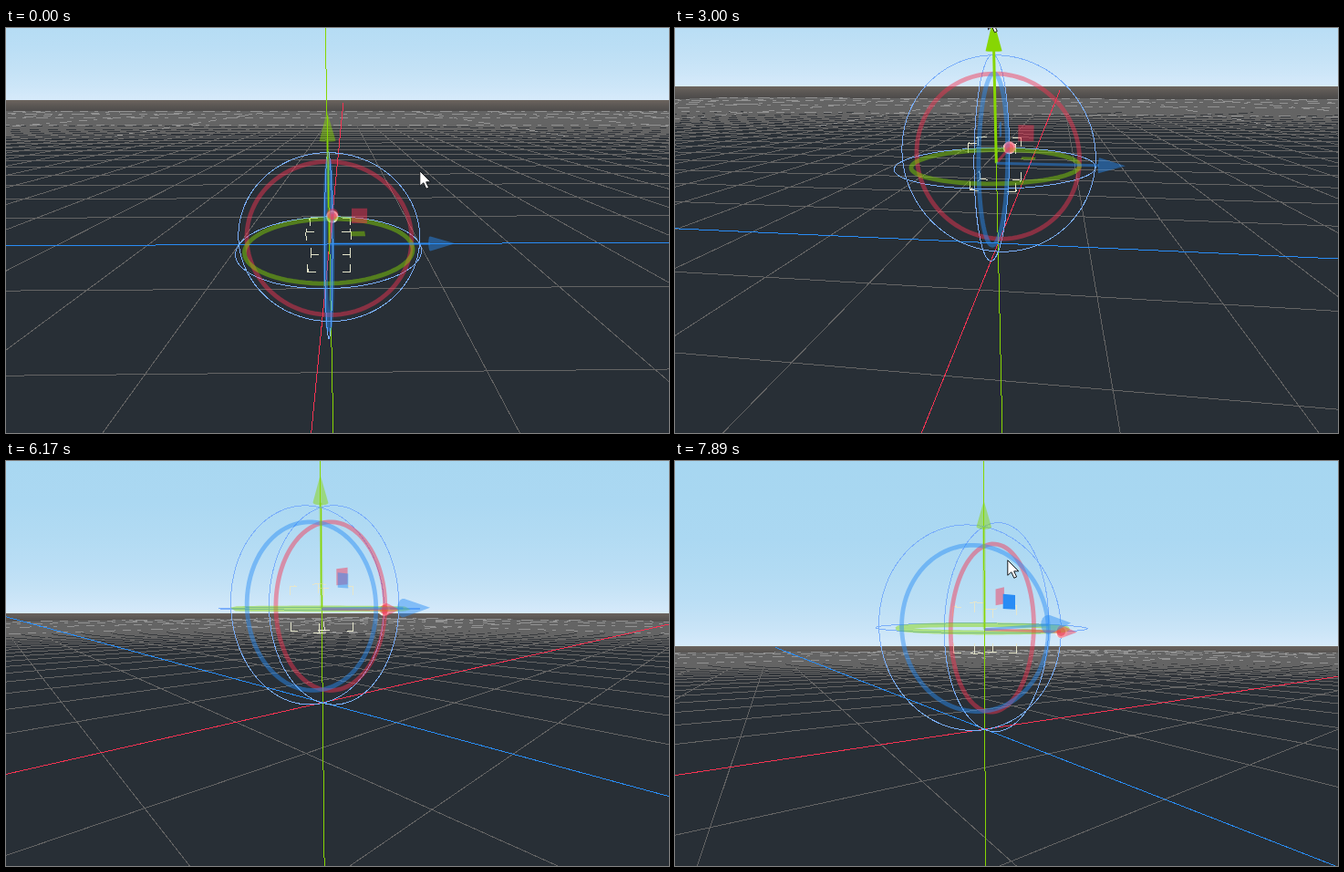
Animation of 727 by 444 pixels, one loop 8000 ms. Source, as an HTML page:

```html
<!DOCTYPE html>
<html>
<head>
<meta charset="utf-8">
<title>3D viewport</title>
<style>
html, body { margin: 0; width: 100%; height: 100%; overflow: hidden; background: #282f36; }
svg { display: block; width: 727px; height: 444px; }
</style>
</head>
<body>
<svg id="view" viewBox="0 0 727 444" xmlns="http://www.w3.org/2000/svg"></svg>
<script>
const LOOP = 8000, TICK = 1000 / 18;
const F = 395, CX = 376, CY = 222, RAD = Math.PI / 180;
const COLORS = ['#f53352', '#87d603', '#298cf5'];
const AXES = [[1, 0, 0], [0, 1, 0], [0, 0, 1]];
const DIM = 0.47;

// Orbit poses: yaw, horizon y, world centre on screen (x, y) and its depth
const POSES = [
  [-0.8, 79, 354.8, 237, 3.99],
  [6.4, 64, 354.3, 236, 4.03],
  [31.6, 143, 354.3, 234, 4.08],
  [58.2, 188, 340.8, 293, 3.68],
  [55.6, 202.5, 339.8, 294, 3.61]
];
// When the camera travels from each pose to the next
const MOVES = [[390, 1220], [4945, 5440], [5440, 6830], [7000, 7885]];

// Where the pointer is seen and what it lights up
const HOVERS = [
  { from: 0, to: 170, at: [453, 156] },
  { from: 1280, to: 4780, grab: 1.33, arrow: 1 },
  { from: 5440, to: 5560, at: [448, 201] },
  { from: 6830, to: 7060, at: [400, 205], arrow: 2 },
  { from: 7885, to: LOOP, at: [364, 108], plane: 2 }
];

const clamp01 = v => Math.min(1, Math.max(0, v));

// The picture advances on ticks; slow phases skip several at a time
function hold(t) {
  let tick = Math.floor((t + 6) / TICK);
  for (const [a, b, stride] of [[47, 86, 6.6], [102, 135, 3]]) {
    if (tick >= a && tick < b) tick = a + Math.floor((tick - a) / stride + 1e-6) * stride;
  }
  return tick * TICK;
}

const pose = t => MOVES.reduce((now, [from, to], i) => {
  const k = clamp01((t - from) / (to - from));
  return now.map((v, j) => v + (POSES[i + 1][j] - POSES[i][j]) * k);
}, POSES[0]);

// Quick pull upwards that settles slowly
const liftAt = t => 0.995 * (1 - Math.exp(-0.0146 * Math.max(0, t - 2115) ** 0.75));

// --- elements ---
const svg = document.getElementById('view');
function el(tag, attrs, parent = svg) {
  const e = document.createElementNS('http://www.w3.org/2000/svg', tag);
  for (const k in attrs) e.setAttribute(k, attrs[k]);
  return parent.appendChild(e);
}
const thin = (color, extra) => el('path', {
  fill: 'none', stroke: color, 'stroke-width': 1, 'shape-rendering': 'crispEdges', ...extra
});

const SKY = [[214, 234, 250], [165, 214, 241]], GROUND = [[108, 101, 95], [40, 47, 54]];
const blend = ([a, b], k) => 'rgb(' + a.map((v, i) =>
  Math.round((v ** 2.2 * (1 - k) + b[i] ** 2.2 * k) ** (1 / 2.2))) + ')';

const grad = el('linearGradient', {
  id: 'sky', gradientUnits: 'userSpaceOnUse', x1: 0, x2: 0, y1: -1500, y2: 1500
}, el('defs', {}));
const stops = [];
const addStop = (e, pair, power) => stops.push({
  e, node: el('stop', { 'stop-color': blend(pair, 1 - (1 - Math.abs(e) / 90) ** power) }, grad)
});
for (let i = 10; i >= 0; i--) addStop(0.45 * i * i, SKY, 11.1);
for (let i = 0; i <= 10; i++) addStop(-0.1 * i * i, GROUND, 50);
el('rect', { width: 727, height: 444, fill: 'url(#sky)' });

const grid = thin('#646464');
const bright = thin('#929292', { 'stroke-dasharray': '9 7 4 11 13 8' });
const axisLines = COLORS.map(c => thin(c));
const sphere = thin('#7aaefa');
const box = thin('#e6e6cc');
const handle = el('circle', { r: 5.8, fill: '#e58a8e', stroke: '#f4ebe8', 'stroke-width': 2 });
const rings = COLORS.map(c => el('path', { fill: 'none', stroke: c, 'stroke-width': 4.8, opacity: DIM }));
const shafts = COLORS.map(c => el('path', { stroke: c, 'stroke-width': 3 }));
const planes = COLORS.map(c => el('path', { fill: c }));
const cones = COLORS.map(c => el('path', { fill: c }));
const cursor = el('path', {
  d: 'M0 0V16.5L4 13L7 19.5L9.8 18.2L6.9 12H12Z', fill: '#fff', stroke: '#15181c', 'stroke-width': 1
});

// --- projection ---
let cam;
function setCamera([yaw, horizon, ox, oy, z]) {
  const p = Math.atan((CY - horizon) / F);
  cam = {
    p, z, x: (ox - CX) / F * z, y: (oy - CY) / F * z,
    sp: Math.sin(p), cp: Math.cos(p), sa: Math.sin(yaw * RAD), ca: Math.cos(yaw * RAD)
  };
}
function toCam([x, y, z]) {
  const d = x * cam.ca - z * cam.sa;
  return [cam.x + x * cam.sa + z * cam.ca, cam.y - y * cam.cp - d * cam.sp, cam.z + d * cam.cp - y * cam.sp];
}
const toScreen = ([x, y, z]) => [CX + F * x / z, CY + F * y / z];
const project = p => toScreen(toCam(p));
const fmt = p => p[0].toFixed(2) + ' ' + p[1].toFixed(2);
const poly = pts => 'M' + pts.map(fmt).join('L') + 'Z';
const add = (a, b, k = 1) => a.map((v, i) => v + b[i] * k);

function seg(a, b, near = 0.1) {
  a = toCam(a);
  b = toCam(b);
  if (a[2] < near && b[2] < near) return '';
  const cut = add(a, add(b, a, -1), (near - a[2]) / (b[2] - a[2]));
  if (a[2] < near) a = cut;
  if (b[2] < near) b = cut;
  return 'M' + fmt(toScreen(a)) + 'L' + fmt(toScreen(b));
}

// Screen points of a figure given as [m, n] in the plane across an axis
function onPlane(centre, axis, pts) {
  const u = AXES[(axis + 1) % 3], v = AXES[(axis + 2) % 3];
  return pts.map(([m, n]) => project(add(add(centre, u, m), v, n)));
}
const circle = (centre, axis, r, n) => onPlane(centre, axis, Array.from({ length: n }, (_, i) => {
  const q = i / n * 2 * Math.PI;
  return [r * Math.cos(q), r * Math.sin(q)];
}));

function hull(pts) {
  pts = pts.slice().sort((a, b) => a[0] - b[0] || a[1] - b[1]);
  const half = list => {
    const h = [];
    for (const p of list) {
      while (h.length > 1) {
        const [a, b] = h.slice(-2);
        if ((b[0] - a[0]) * (p[1] - a[1]) - (b[1] - a[1]) * (p[0] - a[0]) > 0) break;
        h.pop();
      }
      h.push(p);
    }
    return h.slice(0, -1);
  };
  return half(pts).concat(half(pts.reverse()));
}

// --- parts ---
const set = (e, d, opacity) => {
  e.setAttribute('d', d);
  if (opacity) e.setAttribute('opacity', opacity);
};

function drawSky() {
  for (const s of stops) {
    const y = CY - F * Math.tan(s.e * RAD + cam.p);
    s.node.setAttribute('offset', (y + 1500) / 3000);
  }
}

function drawGround() {
  let lines = '', far = '';
  for (let i = -50; i <= 50; i++) {
    for (const [a, b] of [[[i, 0, -50], [i, 0, 50]], [[-50, 0, i], [50, 0, i]]]) {
      lines += seg(a, b);
      if (i % 10 === 0) far += seg(a, b, 16);
    }
  }
  set(grid, lines);
  set(bright, far);
  AXES.forEach((a, i) => set(axisLines[i], seg(a.map(v => -200 * v), a.map(v => 200 * v))));
}

function drawBox(c) {
  const s = 0.23, arm = 0.09;
  let d = '';
  for (let i = 0; i < 8; i++) {
    const sign = [i & 1, i & 2, i & 4].map(b => b ? 1 : -1);
    const corner = add(c, sign, s);
    AXES.forEach((a, j) => { d += seg(corner, add(corner, a, -sign[j] * arm)); });
  }
  set(box, d);
}

// Gizmo sizes scale with depth, so it keeps its size on screen
function drawGizmo(c, hover) {
  const k = toCam(c)[2], lo = 0.061 * k, hi = 0.103 * k;
  AXES.forEach((a, i) => {
    const base = add(c, a, 0.28 * k), tip = add(c, a, 0.35 * k);
    const lit = hover.arrow === i ? 1 : DIM;
    set(rings[i], poly(circle(c, i, 0.228 * k, 96)));
    set(shafts[i], seg(c, base), lit);
    set(cones[i], poly(hull([project(tip), ...circle(base, i, 0.0205 * k, 18)])), lit);
    set(planes[i], poly(onPlane(c, i, [[lo, lo], [hi, lo], [hi, hi], [lo, hi]])), hover.plane === i ? 1 : DIM);
  });
}

function drawCursor({ at, grab }, lift) {
  const pos = grab ? add(project([0, lift + grab, 0]), [-6, 0]) : at;
  cursor.setAttribute('visibility', pos ? 'visible' : 'hidden');
  if (pos) cursor.setAttribute('transform', `translate(${pos[0] + 0.8} ${pos[1] + 0.8})`);
}

function draw(t) {
  const now = hold(t), lift = liftAt(now), centre = [0, lift, 0];
  const hover = HOVERS.find(h => t >= h.from && t < h.to) || {};
  setCamera(pose(now));
  drawSky();
  drawGround();
  set(sphere, AXES.map((_, i) => poly(circle(centre, i, 1, 120))).join(''));
  drawBox(centre);
  const [hx, hy] = project(add(centre, AXES[0]));
  handle.setAttribute('cx', hx);
  handle.setAttribute('cy', hy);
  drawGizmo(centre, hover);
  drawCursor(hover, lift);
}

const start = performance.now();
function frame() {
  draw((performance.now() - start) % LOOP);
  requestAnimationFrame(frame);
}
frame();
</script>
</body>
</html>
```
